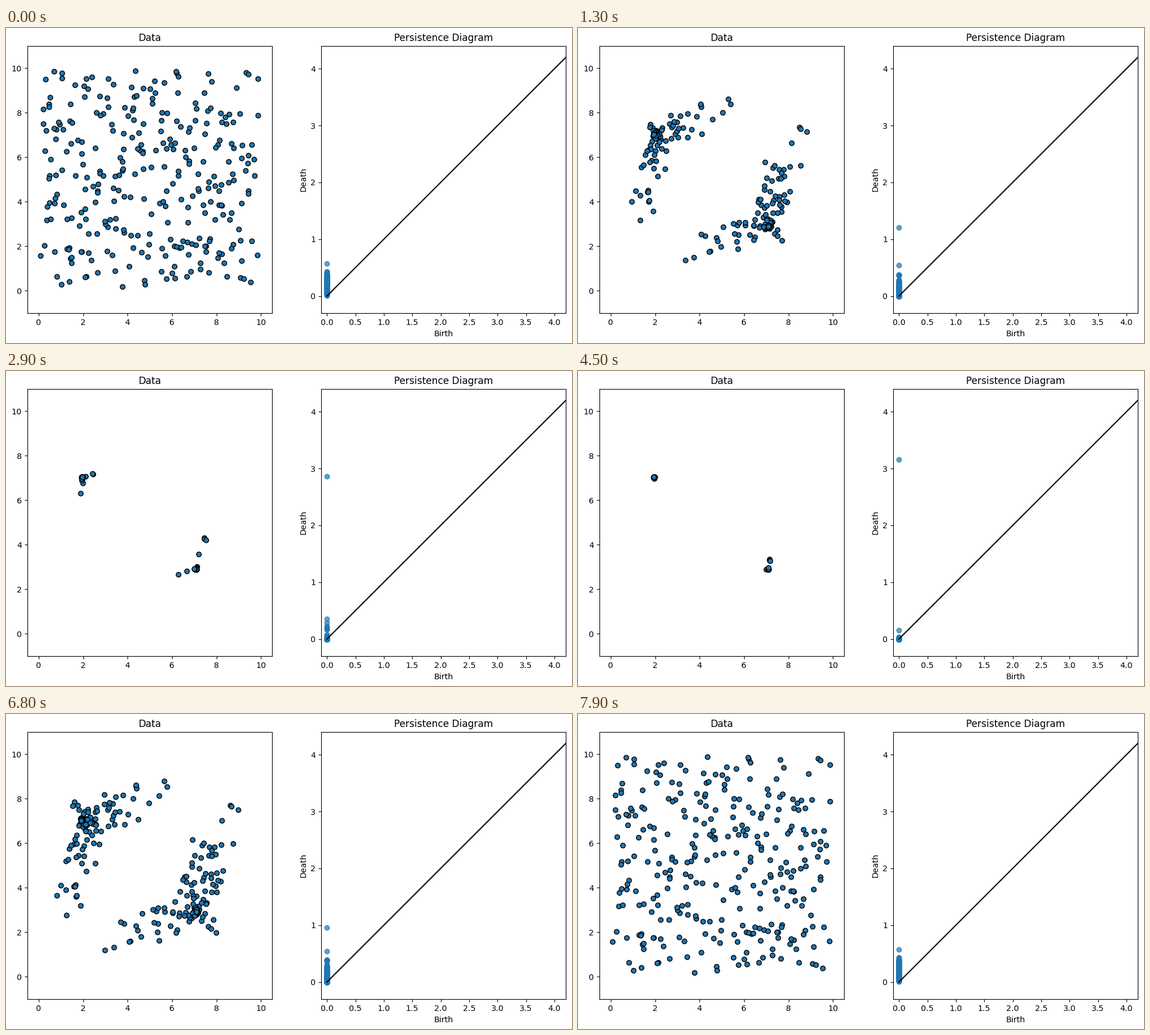
A matplotlib script that plays this animation: 1002x559 px, repeating every 8000 ms.

```python
import numpy as np
import matplotlib.pyplot as plt
from matplotlib.animation import FuncAnimation

W, H, DPI = 1002, 559, 128
K = 0.8  # scale of all point sizes at this dpi
STEPS = 40
COUNT = 300
REACH = 5.8  # random points start no farther than this from a goal
SPEED = 0.2
GOALS = np.array([[2.0, 7.0], [7.0, 3.0]])
DRIFT = np.array([[-0.06, 0.04], [0.13, -0.13]])  # sideways pull close to a goal

# The farthest starters, which form the tails of both swarms.
TAILS = np.array([
    (0.81, 0.65), (0.09, 1.57), (0.71, 1.76), (7.77, 9.39), (7.62, 9.75),
    (6.19, 9.87), (1.01, 0.29), (1.38, 0.41), (2.09, 0.63), (1.92, 1.76),
    (9.32, 9.80), (9.42, 9.72), (9.85, 9.52), (8.89, 9.13),
])

plt.rcParams.update({
    "font.family": "DejaVu Sans",
    "font.size": 10 * K,
    "axes.linewidth": 0.8 * K,
    "axes.titlepad": 6 * K,
    "axes.labelpad": 4 * K,
    "lines.linewidth": 1.5 * K,
})
for side in ("xtick", "ytick"):
    plt.rcParams.update({
        f"{side}.major.size": 3.5 * K,
        f"{side}.major.width": 0.8 * K,
        f"{side}.major.pad": 3.5 * K,
    })


def start_points():
    rng = np.random.default_rng(7)
    pts = rng.uniform(0.15, 9.9, (2 * COUNT, 2))
    dist = np.linalg.norm(pts[:, None] - GOALS, axis=2).min(axis=1)
    return np.vstack([pts[dist < REACH][:COUNT - len(TAILS)], TAILS])


def advance(pts):
    """Move each point toward its nearer goal, slowing on arrival."""
    dist = np.linalg.norm(GOALS - pts[:, None], axis=2)
    aim = GOALS + DRIFT * np.exp(-2 * dist)[..., None]
    to = aim - pts[:, None]
    left = np.maximum(np.linalg.norm(to, axis=2), 1e-9)
    unit = to / left[..., None]
    # Points near the dividing line feel both goals.
    gap = np.clip((dist[:, 0] - dist[:, 1]) / 0.1, -50, 50)
    right = 1 / (1 + np.exp(-gap))
    weight = np.stack([1 - right, right], axis=1)
    heading = (weight[..., None] * unit).sum(axis=1)
    step = np.minimum(SPEED, 0.4 * left.min(axis=1))
    return pts + step[:, None] * heading


def deaths(pts):
    """Half the edge lengths of the minimum spanning tree (Prim)."""
    table = np.linalg.norm(pts[:, None] - pts, axis=2)
    best = table[0].copy()
    best[0] = np.inf
    seen = np.zeros(len(pts), bool)
    seen[0] = True
    edges = []
    for _ in range(len(pts) - 1):
        k = best.argmin()
        edges.append(best[k])
        seen[k] = True
        best = np.where(seen, np.inf, np.minimum(best, table[k]))
    return np.array(edges) / 2


clouds = [start_points()]
while len(clouds) < STEPS:
    clouds.append(advance(clouds[-1]))
diagrams = []
for cloud in clouds:
    d = deaths(cloud)
    diagrams.append(np.column_stack([np.zeros_like(d), d]))

fig = plt.figure(figsize=(W / DPI, H / DPI), dpi=DPI, facecolor="white")


def panel(left, title, xlim, ylim, xticks, yticks):
    ax = fig.add_axes([left / W, 53.1 / H, 433 / W, 474 / H])
    ax.set(title=title, xlim=xlim, ylim=ylim, xticks=xticks, yticks=yticks)
    return ax


even = np.arange(0, 11, 2)
data_ax = panel(38.1, "Data", (-0.5, 10.5), (-1, 11), even, even)
pers_ax = panel(558.1, "Persistence Diagram", (-0.1, 4.2), (-0.3, 4.4),
                np.arange(0, 4.1, 0.5), np.arange(5))
pers_ax.set(xlabel="Birth", ylabel="Death")
pers_ax.plot([0, 5], [0, 5], color="black")

dot = dict(s=36 * K**2, linewidths=K, color="#1f77b4")
data_dots = data_ax.scatter(*clouds[0].T, **dot)
data_dots.set_edgecolor("black")
pers_dots = pers_ax.scatter(*diagrams[0].T, alpha=0.7, **dot)


def update(i):
    k = min(i, 2 * STEPS - 1 - i)
    data_dots.set_offsets(clouds[k])
    pers_dots.set_offsets(diagrams[k])
    return data_dots, pers_dots


anim = FuncAnimation(fig, update, frames=2 * STEPS, interval=100,
                     repeat=True, repeat_delay=0)
plt.show()
```
